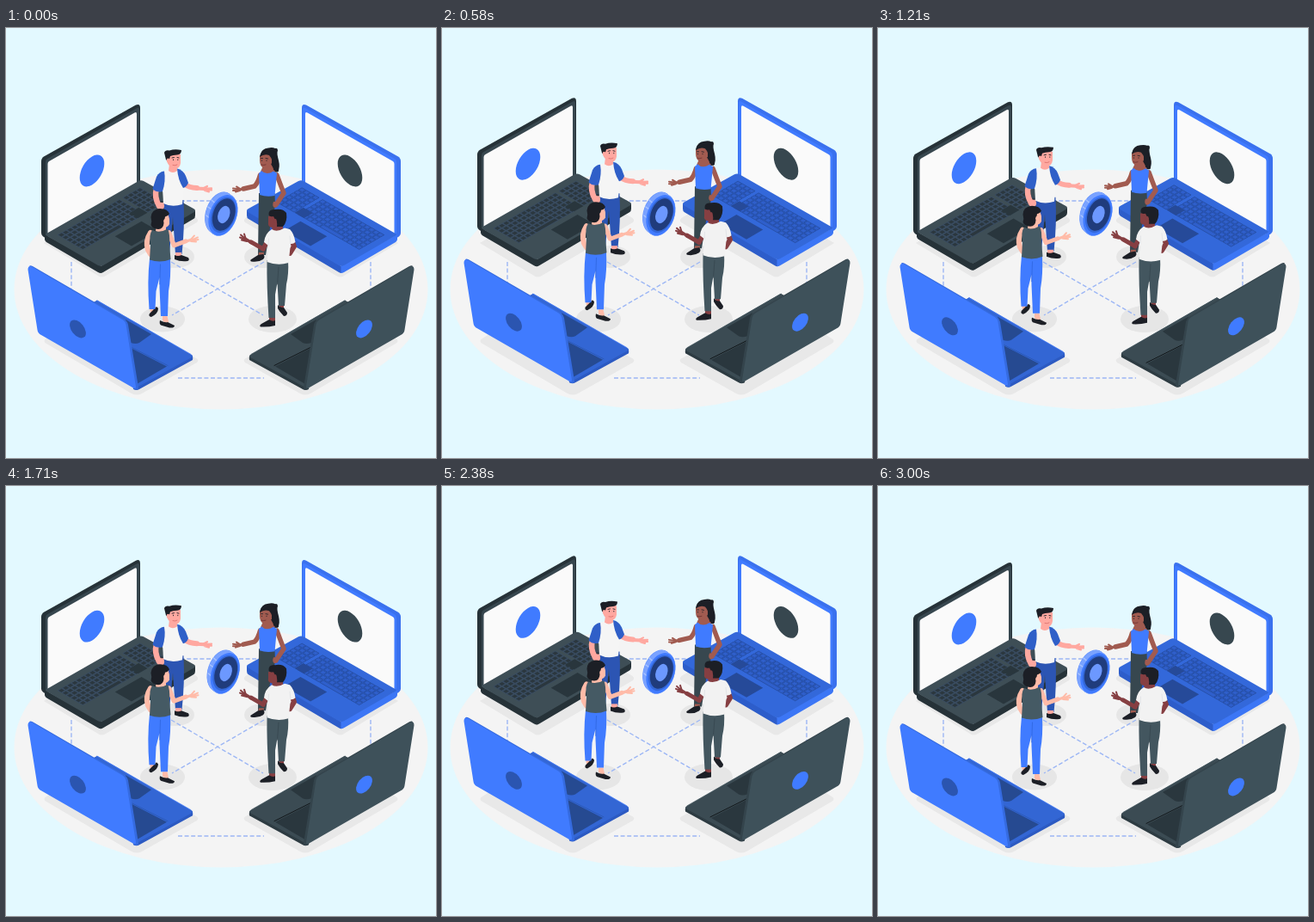
Write an HTML page with a canvas that moves like this. It is 500 px wide and 500 px high and loops after 3.04 s.

```html
<!DOCTYPE html>
<html lang="en">
<head>
<meta charset="utf-8">
<title>Digital coin exchange</title>
<style>
html, body { margin: 0; width: 100%; height: 100%; overflow: hidden; background: #e3f9ff; }
canvas { display: block; width: 500px; height: 500px; }
</style>
</head>
<body>
<canvas id="stage" width="500" height="500"></canvas>
<script>
const g = document.getElementById('stage').getContext('2d');
const LOOP = 3040;
const BLUE = '#407bff', SLATE = '#37474f', INK = '#263238', BLACK = '#1c1f26';
const SHAKE = [0, -1, 2, -4, 4, -4, 4, -4, 2, -1, 0];

const cache = {};
const path = d => cache[d] || (cache[d] = new Path2D(d));

function fill(color, d) {
  g.fillStyle = color;
  g.fill(path(d));
}

function line(color, width, d) {
  g.strokeStyle = color;
  g.lineWidth = width;
  g.lineCap = g.lineJoin = 'round';
  g.stroke(path(d));
}

function oval(color, x, y, rx, ry, turn = 0) {
  g.fillStyle = color;
  g.beginPath();
  g.ellipse(x, y, rx, ry, turn, 0, Math.PI * 2);
  g.fill();
}

// Circle lying in the isometric wall that rises to the right
const disc = (color, x, y, r) => oval(color, x, y, r * 1.2247, r * 0.7071, -Math.PI / 3);
const plate = (color, x, y, k) => oval(color, x, y, 25 * k, 16 * k, -1.22);

function shifted(x, y, draw) {
  g.save();
  g.translate(x, y);
  draw();
  g.restore();
}

function mirrored(draw) {
  g.save();
  g.translate(500, 0);
  g.scale(-1, 1);
  draw();
  g.restore();
}

// Keyboard plane: u runs along the hinge, v towards the user
const deck = (u, v) => [46 + 110 * u + 64 * v, 240 - 63 * u + 37 * v];

function tile(color, u, v, w, h, rim) {
  g.fillStyle = color;
  g.beginPath();
  g.moveTo(...deck(u, v));
  g.lineTo(...deck(u + w, v));
  g.lineTo(...deck(u + w, v + h));
  g.lineTo(...deck(u, v + h));
  g.closePath();
  g.fill();
  if (rim) {
    g.strokeStyle = rim;
    g.lineWidth = 0.6;
    g.stroke();
  }
}

function keyboard(c) {
  for (let r = 0; r < 6; r++) {
    const v = 0.12 + r * 0.078;
    for (let k = 0; k < 18; k++) {
      const gap = k > 13 ? 0.03 : 0;
      if (r === 5 && k > 3 && k < 9) continue;
      tile(c.key, 0.06 + k * 0.047 + gap, v, 0.04, 0.064, c.rim);
    }
    if (r === 5) tile(c.key, 0.06 + 4 * 0.047, v, 0.228, 0.064, c.rim);
  }
  tile(c.pad, 0.64, 0.42, 0.1, 0.16);
}

function backLaptop(c) {
  fill(c.side, 'M44 149.500L151 89.500Q156 87.500 156 93V180L46 244Q41 242 41 238V155Q41 151.500 44 149.500Z');
  fill(c.frame, 'M48 152L151.500 93.500Q155 91.500 155 96V181L48 243Q46 243 46 240V156Q46 153 48 152Z');
  fill('#fafafa', 'M48.500 158Q48.500 156 50 155L149.500 98.500Q152 97 152 100V182L48.500 242Z');
  disc(c.mark, 100, 166, 16.5);
  fill(c.edge, 'M110 277V285Q111.500 285 113 284L218 222Q220 221 220 218V212Z');
  fill(c.near, 'M45 240V246Q45.500 248 47 249L107 284Q109 285.200 110.500 285V276Z');
  fill(c.top, 'M48 238.5L154 178Q157 176.5 160 178L218 210Q222 212 218 214.5L113 276Q110 277.5 107 276L48 242Q44 240 48 238.5Z');
  keyboard(c);
  tile(c.pad, 0.35, 0.66, 0.28, 0.3);
}

function frontLaptop(c) {
  fill(c.edge, 'M102 319L106 317L215 380Q218 381 217 386L155 420Q152 422 148 420L139 340Z');
  fill(c.top, 'M102 319L106 316.5L215 379.500Q219 381.500 215 383.500L152 418L139 342Z');
  fill(c.pad, 'M139 339L169 356L155 366Q151 368 145 366Z');
  fill(c.pad, 'M146 372.500L187 393.500L152 414Z');
  line(c.slot, 1, 'M146 371.500L188 392.500');
  line(c.shine, 0.8, 'M106 317L215 379.5');
  fill(c.side, 'M27 277Q28 275.5 31 277L138 339Q141 341 142 345L154 418Q154 422 149 420L139 400Z');
  fill(c.lid, 'M25.500 281Q25.500 276 30 277.500L136 339.500Q139 341.500 139.500 345L151 417Q151 420 148 418.500L41 357Q37 355 36.500 351Z');
  oval(c.mark, 83.5, 350, 12, 7.3, 0.9);
}

const slate = { side: INK, frame: '#37474f', top: '#3e4e56', edge: INK, near: INK, key: '#2b373e',
  rim: '#3c5170', pad: '#29363d', mark: BLUE };
const azure = { side: '#3a71ee', frame: BLUE, top: '#3368da', edge: '#2d5dca', near: '#3c76f5',
  key: '#2f5fcb', rim: '#22458f', pad: '#264a99', mark: SLATE };
const azureFront = { lid: BLUE, side: '#356be0', top: '#3366d4', edge: '#2c5ac2', pad: '#264a91',
  slot: '#2c5ab8', shine: '#4a80fa', mark: '#2b55b0' };
const slateFront = { lid: '#3e515a', side: '#34444c', top: '#3b4b53', edge: '#2d3b42', pad: '#2a373e',
  slot: '#12171a', shine: '#465861', mark: BLUE };

function floor() {
  oval('#f4f4f4', 250, 304, 240.5, 139.5);
  const shades = () => {
    fill('#e8e8e8', 'M44 250L107 288Q111 291 116 288L222 226Q225 223 220 220L156 184Z');
    fill('#e8e8e8', 'M47 361Q42 364 47 367L146 425Q152 428 158 425L222 389Q225 386 221 384L108 322Z');
  };
  shades();
  mirrored(shades);
  oval('#e6e6e6', 182, 338.500, 26, 15);
  oval('#e6e6e6', 310, 338.500, 28, 15.5);
  oval('#e6e6e6', 197, 266, 22, 13);
  oval('#e6e6e6', 299, 266, 22, 13);
  g.setLineDash([5, 2.6]);
  g.lineCap = 'butt';
  g.lineWidth = 1.4;
  g.strokeStyle = '#9db7f5';
  g.stroke(path('M195 201H305M200 407H300M76 272V303M424 272V303M192 272L299 334M300 272L193 334'));
  g.setLineDash([]);
}

function backMan() {
  const skin = '#ffa8a0';
  fill('#2c55b3', 'M184 200H206.500Q208 232 204.500 263H197L194 220L190 262H184Q182 228 184 200Z');
  fill(skin, 'M197 261H204V266H197Z');
  fill(BLACK, 'M196 264Q200 266 204 264L212 267Q214 270 211 271Q203 272 196 269Z');
  line(skin, 6.500, 'M175 187Q172 196 178 207');
  fill(skin, 'M175 203L183 203Q186 209 181 212L178 210Z');
  line(skin, 6, 'M207 181Q213 186 222 186');
  line(skin, 4, 'M221 186.500L231 187');
  line(skin, 2.2, 'M230 186L234 184M230 187L239 186.500M230 188L239 188.500M231 189L236 190.500');
  fill('#f5f5f5', 'M181 168Q188 164 199 164L205 168L207 183L205 205Q193 209 183 204Z');
  fill('#2f5fc8', 'M184 166.500Q178 167 175 173L170.500 187Q175 192 182 190Q186 178 184 166.500Z');
  fill('#2f5fc8', 'M199 163.500Q206 165 209 172L212 180Q210 185 206 186Q200 177 199 163.500Z');
  fill(skin, 'M190 158H199V166Q194 170 189 166Z');
  fill(skin, 'M187 148Q194 144 203 147V157Q202 163.500 197 163.500Q189 162 187 155Z');
  fill(BLACK, 'M184 145Q185 141.500 190 142.500Q196 140.500 204 142Q204 147 199 147.500Q194 147.500 191 149L189.500 154Q186 155 185.500 151Z');
  oval(skin, 188.5, 154, 1.8, 2.4);
  line(BLACK, 0.9, 'M193 151L195.500 150.500M199 150.500L201 151M194.500 153V153.600M199.800 153V153.600');
  line('#d96c69', 0.8, 'M194 159.500Q197 160.500 199 159');
}

function backWoman() {
  const skin = '#a15b50';
  fill(BLACK, 'M295.500 148Q297 140 305 139.500Q310 138.500 313 140Q316 139 316 142.500Q314.500 145 317 154Q319 162 316 167.500L305 168L298 158Z');
  fill(SLATE, 'M294 192H312.500L313 208L309 220L302 264H293Z');
  fill(skin, 'M294 261H300L299 267H293Z');
  fill(BLACK, 'M299 263Q302 266 299 269Q293 273 285 271.500Q283 270 286 268.500L293 264Z');
  line(skin, 5.500, 'M295.500 171Q293 180 289 184L276 187');
  line(skin, 3.200, 'M280 186.500L271 188');
  line(skin, 2, 'M272 187L268 184.500M272 187.500L264 186.500M272 188.500L264 189M272 189L267 190.500');
  line(skin, 5.500, 'M315 171Q319 182 323 192L315 204');
  fill(skin, 'M311 202L317 202Q318 209 312 209Q309 207 311 202Z');
  fill(skin, 'M300 158H308L313 167L305 172L296 167Z');
  fill(BLUE, 'M297 166Q303 172 311 166.500L315 169L312.500 195Q303 197 295 194L294 169Z');
  fill(skin, 'M295 149Q301 144 309 148V157Q306 163 300 163Q295 161 295 154Z');
  fill(BLACK, 'M295 150Q296 142 304 141Q314 141 315 149L317 167L311 165Q311 153 306 148Q300 146 295 150Z');
  line(BLACK, 0.8, 'M296.500 151.500H298.500M302 151.500L304.500 152M297.500 154V154.500M303 154V154.500');
  line('#6c3030', 0.8, 'M297 159Q299.500 160 302 159');
}

function frontWoman() {
  const skin = '#ffbba8';
  fill(skin, 'M182 335H187.500L189 342Q185 344 182 340Z');
  fill(skin, 'M167 324H174L172 331Q169 334 168 331Z');
  fill(BLACK, 'M175 324L177 326Q177 332 169 336Q165 335 167 332Z');
  fill(BLACK, 'M179 340Q185 343 188 342L196 346Q196 349 190 348.500L180 345.500Q178 344 179 340Z');
  fill(BLUE, 'M167 268H191Q192 290 189 306L188 335H180L178.500 302L178.500 290L174.500 306L173.500 327H166.500Q164 295 167 268Z');
  line('#2c62d9', 0.7, 'M179.500 275L178.700 298');
  line(skin, 6, 'M168 238Q161.500 248 165 258L168 263');
  line(skin, 5.500, 'M189.500 238L195 252');
  line(skin, 5, 'M195.500 253L209 248');
  line(skin, 3.200, 'M207 249L216 246');
  line(skin, 2, 'M215 246L219 241.500M215 247L223 243.500M216 247.500L223.500 246M215 248L221 248.500');
  fill(skin, 'M175 228H186V237Q180 241 174 236Z');
  fill('#455a64', 'M170 235Q179 239 188 233.500Q191 240 190 251L191.500 269Q179 274 167 269.500L168 252Q166 240 170 235Z');
  fill(skin, 'M179 215H188L190 222V228Q188 233 181 232Z');
  fill(BLACK, 'M168.500 220Q169 211 179 210Q188 210 190 216Q188.500 219 185 219.500L183.500 227Q183 233.500 177 234Q170 233.500 168.500 229Q170 225 168.500 220Z');
  oval(skin, 185, 224.5, 1.8, 2.5);
}

function frontMan() {
  const skin = '#863f42';
  fill(skin, 'M306 333H313V342H306ZM317 320H323V329H318Z');
  fill(BLACK, 'M316 322Q319 326 323 325L327 331Q327 335 323 335Q318 330 316 326Z');
  fill(BLACK, 'M306 339Q310 342 313 340V346Q305 348 296 347.500Q294 346 297 344Z');
  fill('#43565f', 'M303.500 270H328Q329 286 326 298L324 323H317L315.500 296L313 310V337H305.500Q303 300 303.500 270Z');
  line('#34444c', 0.7, 'M317 278L315.500 298');
  line(skin, 5.500, 'M306 244L299 257');
  line(skin, 5, 'M299 257L285 249');
  line(skin, 3.500, 'M286 250L278 245');
  line(skin, 2, 'M279 246L277 239.500M278 245L273 240.500M278 246L272 243.500M280 248L274 246.500');
  line(skin, 6, 'M332 246L335 254L330 262');
  fill(skin, 'M310 228H322V237L309 237Z');
  fill('#f2f2f2', 'M309 234Q315 238 324 232.500L330 234Q335 239 336.500 249Q334 251.500 331 251L328.500 273Q316 277 303.500 272L305 253L300 249Q301 239 309 234Z');
  line('#dcdfe2', 0.7, 'M330 242L331 251M305.500 245L305 254');
  fill(skin, 'M305 219L314 215L320 220V230Q315 233 309 232Q304 231 305 226Z');
  fill(BLACK, 'M305.500 217Q305 210.500 313 211Q322 209.500 326 215Q327.500 225 322 231L315 231Q316 225 313 223L311 219Q306 220 305.500 217Z');
  oval(skin, 313, 224.5, 1.8, 2.6);
}

function coin() {
  for (let i = 0; i <= 12; i++) {
    plate(i < 2 ? '#6e9aff' : '#7ba3ff', 248.5 + i * 0.32, 214.6 + i * 0.26, 1);
  }
  line('#a9c4ff', 1.4, 'M233 218L236 220.500M235 208L238.500 210.500M239 200L242.500 203');
  plate(BLUE, 252.400, 217.700, 0.98);
  plate('#3367d8', 252.800, 217.400, 0.86);
  plate('#203c7c', 253.400, 217, 0.78);
  plate('#6c98ff', 253.400, 217, 0.42);
}

function pose(t) {
  const s = (t + 25) % 3000;
  const rise = 1 - Math.abs(1 - (s % 1500) / 750);
  const step = Math.floor(s / 300);
  const sway = SHAKE[step] + (SHAKE[step + 1] - SHAKE[step]) * (s / 300 - step);
  return { lift: 0.3 - 10 * rise, sway };
}

function draw(t) {
  const { lift, sway } = pose(t);
  g.fillStyle = '#e3f9ff';
  g.fillRect(0, 0, 500, 500);
  floor();
  shifted(0, lift, () => {
    backLaptop(slate);
    mirrored(() => backLaptop(azure));
    backMan();
    backWoman();
  });
  shifted(sway, 0, coin);
  shifted(0, lift, () => {
    frontWoman();
    frontMan();
    frontLaptop(azureFront);
    mirrored(() => frontLaptop(slateFront));
  });
}

const start = performance.now();
function tick() {
  draw((performance.now() - start) % LOOP);
  requestAnimationFrame(tick);
}
tick();
</script>
</body>
</html>
```
